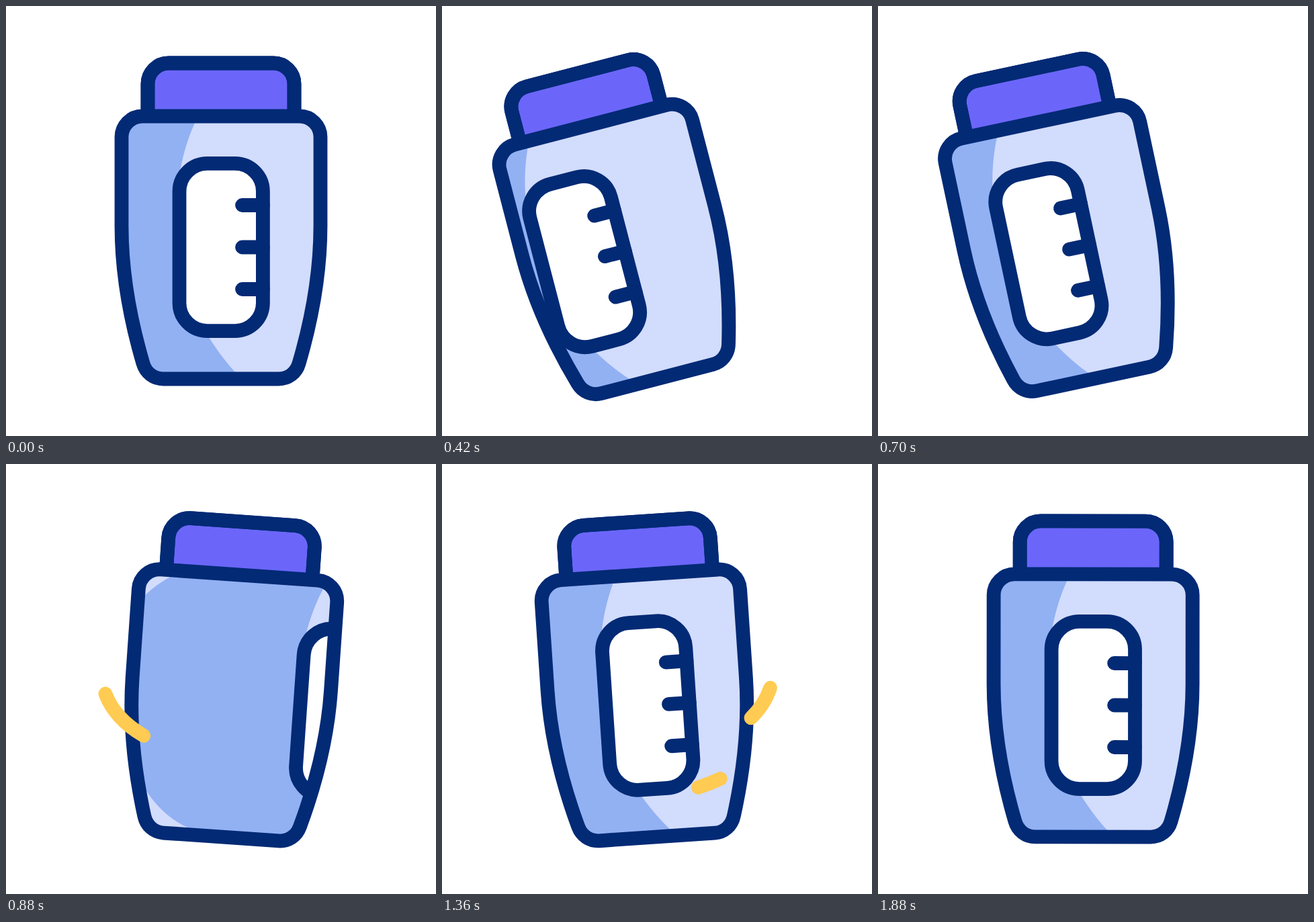
Write an HTML page that moves like this. It is 640 px wide and 640 px high and loops after 2400 ms.

```html
<!DOCTYPE html>
<html lang="en">
<head>
<meta charset="utf-8">
<title>Bottle</title>
<style>
  html, body { margin: 0; width: 100%; height: 100%; overflow: hidden; background: #fff; }
  svg { display: block; width: 100vw; height: 100vh; }
  .line { fill: none; stroke: #032a75; stroke-width: 20.8; stroke-linecap: round; stroke-linejoin: round; }
  .swish { fill: none; stroke: #ffcb52; stroke-width: 20.8; stroke-linecap: round; }
</style>
</head>
<body>
<svg viewBox="0 0 640 640">
  <defs>
    <path id="body" d="M203 164H437a31 31 0 0 1 31 31V327C468 392 456 464 436 532C432 546 420 555 406 555H234C220 555 208 546 204 532C184 464 172 392 172 327V195a31 31 0 0 1 31-31Z"/>
    <clipPath id="inside"><use href="#body"/></clipPath>
    <g id="wrap">
      <path fill="#92b1f3" d="M281 174C240 264 232 425 341 545L345 560H103V544.5Q65 530 37 493C-38 405 -38 270 16 204Q33 186 52 174V160H288Z"/>
      <rect x="258" y="234.4" width="124.4" height="249.2" rx="41.6" fill="#fff"/>
      <rect class="line" x="258" y="234.4" width="124.4" height="249.2" rx="41.6"/>
      <path class="line" d="M351.5 296.5H382.4M351.5 359H382.4M351.5 421.5H382.4"/>
    </g>
  </defs>
  <g id="bottle">
    <path id="cap" fill="#6b66f9" d="M211 163V116a31 31 0 0 1 31-31H398a31 31 0 0 1 31 31V163"/>
    <use href="#cap" class="line"/>
    <path class="line" d="M211 163V116a31 31 0 0 1 31-31H398a31 31 0 0 1 31 31V163"/>
    <use href="#body" fill="#d2dcfd"/>
    <g clip-path="url(#inside)">
      <use href="#wrap" id="front"/>
      <use href="#wrap" id="next"/>
    </g>
    <use href="#body" class="line"/>
    <path id="long" class="swish" pathLength="1" d="M133.5 354.5C187 470 455 463 503 345"/>
    <path id="short" class="swish" pathLength="1" d="M321 491Q372 494 420 475"/>
  </g>
</svg>
<script>
const LOOP = 2400, STEP = 20, LAST = 1880, TURN = 668;

// Each table lists [time in ms, value], eased between neighbours.
const tilt = [[0, 0], [576, -17.8], [981, 8], [1333, -4], [1610, 2], [1900, 0]];
const spin = [[0, 0], [576, -74], [1376, TURN]];
const swishes = [
  { el: byId("long"), head: [[699, 0], [1329, 1]], tail: [[900, 0], [1490, 1]] },
  { el: byId("short"), head: [[954, 0], [1354, 1]], tail: [[1150, 0], [1500, 1]] }
];
const bottle = byId("bottle"), front = byId("front"), next = byId("next");

function byId(id) { return document.getElementById(id); }

function ease(p) { return p * p * (3 - 2 * p); }

function valueAt(keys, t) {
  if (t <= keys[0][0]) return keys[0][1];
  for (let i = 1; i < keys.length; i++) {
    const [t0, a] = keys[i - 1], [t1, b] = keys[i];
    if (t < t1) return a + (b - a) * ease((t - t0) / (t1 - t0));
  }
  return keys[keys.length - 1][1];
}

function trim({ el, head, tail }, t) {
  const from = valueAt(tail, t), to = valueAt(head, t);
  el.style.display = to - from > 0.001 ? "" : "none";
  el.setAttribute("stroke-dasharray", `${to - from} 3`);
  el.setAttribute("stroke-dashoffset", -from);
}

function draw(t) {
  const x = valueAt(spin, t);
  bottle.setAttribute("transform", `rotate(${valueAt(tilt, t)} 320 555)`);
  front.setAttribute("x", x);
  next.setAttribute("x", x - TURN);
  swishes.forEach(s => trim(s, t));
}

const start = performance.now();
function tick() {
  const t = (performance.now() - start) % LOOP;
  draw(Math.min(LAST, Math.floor(t / STEP) * STEP));
  requestAnimationFrame(tick);
}
draw(0);
requestAnimationFrame(tick);
</script>
</body>
</html>
```
